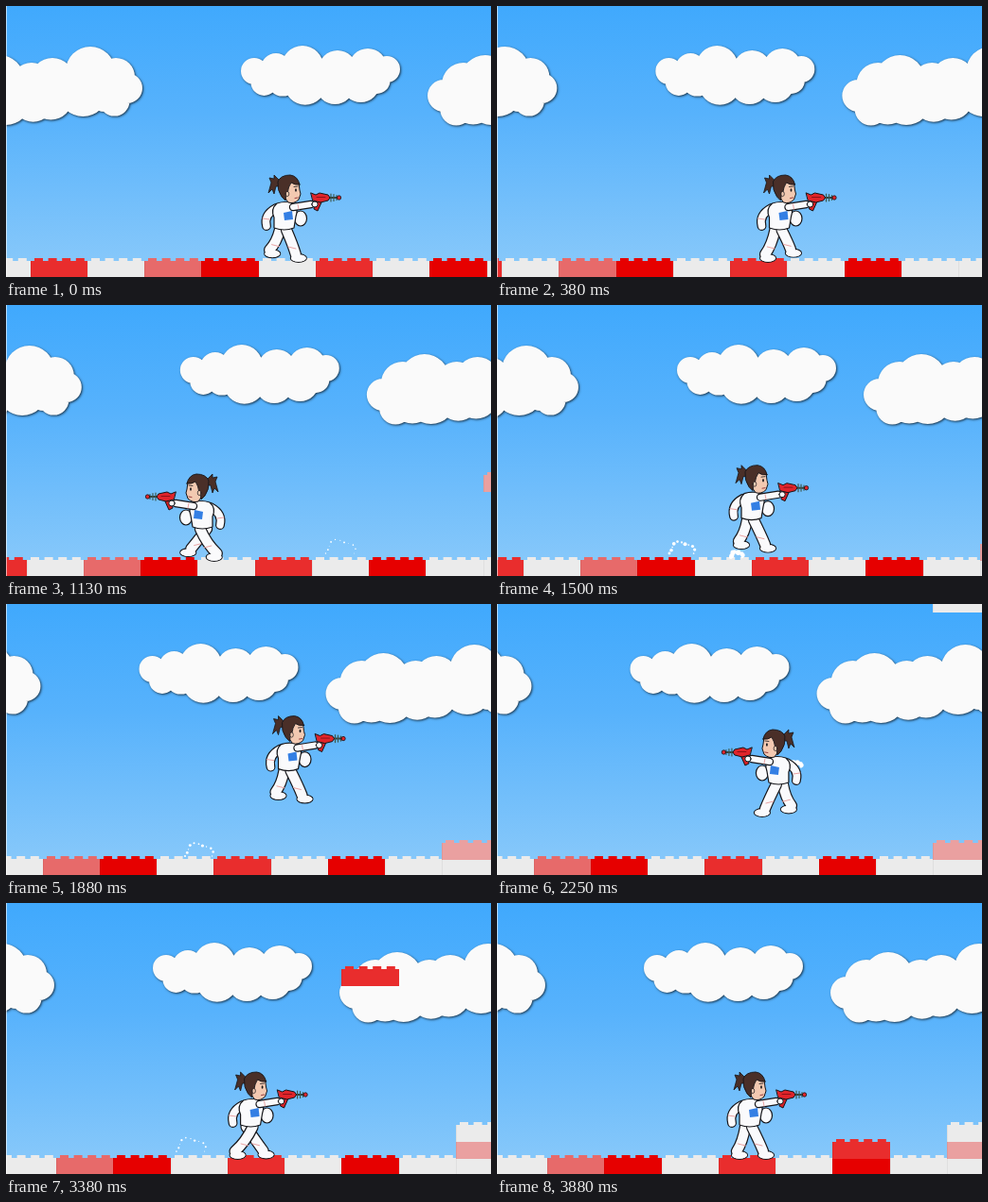
An HTML page with a canvas for the animation above (3.93 s loop, 512 by 287 pixels).

```html
<!DOCTYPE html>
<html lang="en">
<head>
<meta charset="utf-8">
<title>Brick runner</title>
<style>
html, body { margin: 0; height: 100%; overflow: hidden; background: #4aacfd; }
canvas { display: block; width: 100vw; height: 100vh; }
</style>
</head>
<body>
<canvas id="stage" width="512" height="287"></canvas>
<script>
const ctx = document.getElementById('stage').getContext('2d');
const LOOP = 3930, STEP = 1000 / 24, GROUND = 270, BRICK = 60.25, FALL = .286;
const INK = '#16161a', SUIT = '#fafafc', HAIR = '#4a2f28', SKIN = '#f3c9b1', SEAM = '#e9a3a3';
const paint = { w: '#ebebeb', r: '#e92d2d', s: '#e60000', p: '#e76a6a', l: '#eaa0a0' };
const FLOOR = 'wrwpswrwswww';

// The runner goes back and forth, easing into each turn
const START = 292;
const runs = [
  { at: 0, time: 530, to: 398 }, { at: 530, time: 690, to: 264 }, { at: 1220, time: 610, to: 404 },
  { at: 2220, time: 636, to: 299 }, { at: 2856, time: 689, to: 358 }
];
const jump = { at: 1460, time: 1040, height: 63 };
const drops = [
  { at: 430, col: 9, colour: paint.l, land: 250 },
  { at: 2215, col: 9, colour: paint.w, land: 232 },
  { at: 3063, col: 7, colour: paint.r, land: 250, rush: 3600 }
];
// Upper lobes of each cloud: x, y, radius; the lower ones follow from them
const smallCloud = [[14, 69, 14], [37, 66, 16], [65, 64, 22], [102, 67, 20], [134, 65, 20], [154, 67, 14]];
const bigCloud = [[17, 95, 17], [38, 83, 23], [61, 78, 26], [95, 82, 22], [117, 78, 23], [157, 69, 26],
  [184, 75, 20], [196, 87, 16]];

const clamp = v => Math.max(0, Math.min(1, v));
const columnX = k => 25.5 + k * BRICK;

function runner(t) {
  let x = START, cam = 0, travel = 0, dir = 1, moving = false;
  for (const run of runs) {
    if (t < run.at) break;
    const u = clamp((t - run.at) / run.time), from = x;
    dir = Math.sign(run.to - from);
    x += (run.to - from) * (1 - Math.cos(Math.PI * u)) / 2;
    cam = dir > 0 ? Math.max(cam, x - 296.5) : Math.min(cam, x - 206);
    travel += Math.abs(x - from);
    moving = u < 1;
  }
  const j = clamp((t - jump.at) / jump.time);
  return { x, cam, travel, dir, moving, lift: 4 * jump.height * j * (1 - j) };
}

function brick(col, y, colour, cam) {
  const x = Math.round(columnX(col) - cam), w = Math.round(columnX(col + 1) - cam) - x;
  y = Math.round(y);
  ctx.fillStyle = colour;
  ctx.fillRect(x, y + 3, w, 18);
  for (let i = 0; i < 4; i++) ctx.fillRect(x + 4 + i * 14.6, y, 9, 4);
  ctx.fillStyle = 'rgba(0,0,0,.05)';
  ctx.fillRect(x, y + 3, 1, 18);
}

function drop({ at, col, colour, land, rush = LOOP }, t, cam) {
  if (t < at) return;
  const y = -22 + FALL * (t - at + Math.max(0, t - rush));
  brick(col, Math.min(land, y), colour, cam);
}

function cloud(left, middle, lobes) {
  ctx.save();
  ctx.shadowColor = 'rgba(0,0,0,.7)';
  ctx.shadowBlur = 2.5;
  ctx.shadowOffsetX = ctx.shadowOffsetY = 1;
  ctx.fillStyle = '#fafafa';
  ctx.beginPath();
  const lobe = (x, y, r) => {
    ctx.moveTo(left + x + r, y);
    ctx.arc(left + x, y, r, 0, 7);
  };
  for (const [x, y, r] of lobes) {
    lobe(x, y, r);
    lobe(x + (middle - x) * .15, y + r * .85, r);
  }
  ctx.fill();
  ctx.restore();
}

function puff(age, x, y) {
  if (age < 0 || age > 620) return;
  const r = 4 + 12 * (1 - Math.exp(-age / 200)), size = 2.9 * (1 - age / 900);
  ctx.fillStyle = '#fff';
  for (let i = 0; i < 11; i++) {
    const a = Math.PI * (1 + i / 10), wob = r * (1 + .12 * Math.sin(i * 5));
    ctx.beginPath();
    ctx.arc(x + Math.cos(a) * wob, y + Math.sin(a) * wob * .9, size * (.7 + .3 * Math.sin(i * 2.4)), 0, 7);
    ctx.fill();
  }
}

function puffs(t) {
  for (const { at } of runs.slice(1)) {
    const { x, dir, lift } = runner(at);
    puff(t - at, x - dir * 15 + 4, GROUND - lift - (lift ? 48 : 7));
  }
  puff(t - jump.at, runner(jump.at).x, GROUND - 3);
}

function shape(path, fill, width = 1.2) {
  const p = new Path2D(path);
  ctx.fillStyle = fill;
  ctx.fill(p);
  if (!width) return;
  ctx.lineWidth = width;
  ctx.strokeStyle = INK;
  ctx.stroke(p);
}

function oval(x, y, rx, ry, fill, width) {
  shape(`M${x - rx} ${y}a${rx} ${ry} 0 1 0 ${2 * rx} 0a${rx} ${ry} 0 1 0 ${-2 * rx} 0Z`, fill, width);
}

function line(path, colour, width) {
  ctx.strokeStyle = colour;
  ctx.lineWidth = width;
  ctx.stroke(new Path2D(path));
}

function limb(path, width) {
  line(path, INK, width + 2.4);
  line(path, SUIT, width);
}

function leg(hip, fx, fy) {
  const kx = (hip + fx) / 2 + 2, ky = (fy - 36) / 2;
  oval(fx + 3, fy - 4, 8.5, 4.3, SUIT);
  limb(`M${hip} -34Q${kx} ${ky} ${fx} ${fy - 8}`, 10);
  oval(fx + 3, fy - 4, 8, 3.8, SUIT, 0);
  line(`M${kx - 5} ${ky + 2}l8 2`, SEAM, 1);
}

function legs(h) {
  const phase = h.moving ? .4 + h.travel * .0637 : 0;
  const free = h.moving && !h.lift;
  for (const [hip, a] of [[-3, phase + Math.PI], [4, phase]])
    if (free) leg(hip, 15 * Math.cos(a), 12 * Math.min(0, Math.sin(a)));
    else leg(hip, hip * 4, h.lift ? hip / 2 - 2 : 0);
}

function gun() {
  line('M49 -68H58', '#33433f', 2);
  line('M51 -72V-64M54 -71.5V-64.5M57 -70.5V-65.5', '#3d5b53', 1.2);
  oval(59.5, -68, 2.2, 2.2, '#e3262b', .8);
  shape('M34 -64L33 -56L37 -54L41 -63Z', '#d81f25', 1);
  shape('M30 -73L35 -71L39 -73L48 -71L50 -68L48 -65L40 -63L32 -65Z', '#e0242a', 1);
  line('M36 -68.5H45', '#8e1218', 1);
}

function head() {
  shape('M-4 -87L-9 -92L-9 -88L-14 -89L-12 -84L-15 -73L-11 -77L-9 -72L-7 -80L-3 -80Z', HAIR, .8);
  shape('M4 -86L17 -84L18 -76L19 -72L17 -66Q12 -61 6 -63L1 -70Z', SKIN, 1);
  shape('M18 -82Q16 -91 8 -92Q-2 -92 -5 -85Q-6 -76 -1 -69L3 -65Q3 -70 5 -72Q6 -80 9 -84Q13 -81 18 -82Z', HAIR, .9);
  oval(5, -72, 1.8, 2.6, SKIN, .7);
  oval(14, -76, .9, 1.8, INK, 0);
  line('M12 -79.5L16 -80', INK, .8);
  line('M13 -67.5L16 -68', '#9b3e3e', 1);
}

function hero(h) {
  ctx.save();
  ctx.translate(h.x + 1.5, GROUND + 1 - h.lift);
  ctx.scale(h.dir, 1);
  ctx.translate(-1.5, 0);
  ctx.lineJoin = ctx.lineCap = 'round';
  legs(h);
  oval(19, -46, 6.5, 8, SUIT);
  limb('M-7 -57Q-20 -50 -17 -38', 7.5);
  shape('M-6 -62Q3 -65 12 -62Q17 -57 14 -48L12 -36Q2 -32 -9 -36L-9 -47Q-13 -56 -6 -62Z', SUIT);
  limb('M11 -58L30 -61', 6);
  line('M16 -61L17 -56M-21 -46L-14 -45', SEAM, 1);
  shape('M1 -52L10 -54L11 -45L2 -44Z', '#347fe4', 0);
  gun();
  oval(34, -61, 3.2, 3, SUIT, 1);
  head();
  ctx.restore();
}

const sky = ctx.createLinearGradient(0, 0, 0, 287);
sky.addColorStop(0, '#40a9fd');
sky.addColorStop(.4, '#57b2fc');
sky.addColorStop(1, '#8bcafa');

function draw(now) {
  const t = Math.floor((now % LOOP + 5) / STEP) * STEP;
  const h = runner(t);
  ctx.fillStyle = sky;
  ctx.fillRect(0, 0, 512, 287);
  ctx.save();
  ctx.translate(-h.cam, 0);
  cloud(-68, 106, bigCloud);
  cloud(248, 84, smallCloud);
  cloud(445, 106, bigCloud);
  ctx.restore();
  [...FLOOR].forEach((c, i) => brick(i - 1, 267, paint[c], h.cam));
  drops.forEach(d => drop(d, t, h.cam));
  ctx.save();
  ctx.translate(-h.cam, 0);
  puffs(t);
  hero(h);
  ctx.restore();
  ctx.fillStyle = 'rgba(255,255,255,.6)';
  ctx.fillRect(0, 0, 1, 287);
}

const begin = performance.now();
function tick() {
  draw(performance.now() - begin);
  requestAnimationFrame(tick);
}
tick();
</script>
</body>
</html>
```
